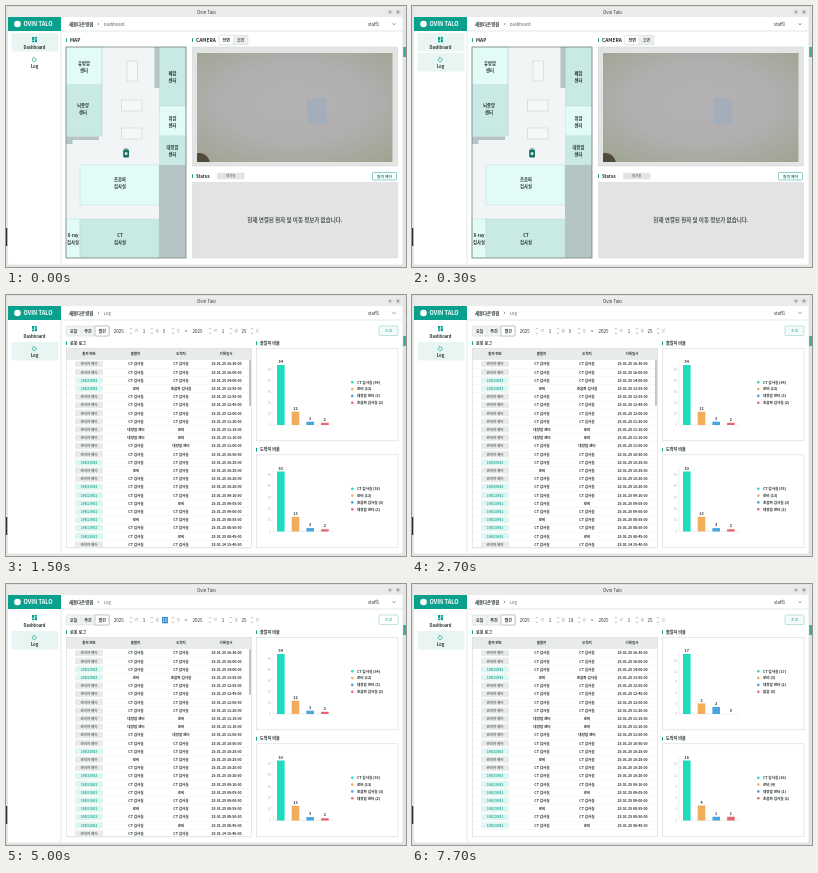
An HTML page with a canvas that plays this animation: 400x261 px, repeating every 8 s.

```html
<!DOCTYPE html>
<html lang="ko">
<head>
<meta charset="utf-8">
<title>Ovin Talo</title>
<style>
html, body { margin: 0; width: 100%; height: 100%; overflow: hidden; background: #e3e6e5; }
canvas { display: block; width: 400px; height: 261px; }
</style>
</head>
<body>
<canvas id="stage"></canvas>
<script>
const W = 400, H = 261, LOOP = 8000;
const canvas = document.getElementById('stage');
const dpr = window.devicePixelRatio || 1;
canvas.width = Math.round(W * dpr);
canvas.height = Math.round(H * dpr);
const g = canvas.getContext('2d');
const FONT = '"Noto Sans CJK KR", "Noto Sans", sans-serif';
const TEAL = '#09a18d', INK = '#26302f', PALE = '#e2fbf7', MID = '#c9e9e4', GREY = '#b5c5c5', LINE = '#d3d9d9';
const BARS = ['#1fdbbd', '#f2ad5b', '#4ba5dd', '#e66570'];

function box(x, y, w, h, fill, stroke, lw = 0.6) {
  if (fill) { g.fillStyle = fill; g.fillRect(x, y, w, h); }
  if (stroke) { g.strokeStyle = stroke; g.lineWidth = lw; g.strokeRect(x, y, w, h); }
}
function round(x, y, w, h, r, fill, stroke, lw = 0.6) {
  g.beginPath();
  g.roundRect(x, y, w, h, r);
  if (fill) { g.fillStyle = fill; g.fill(); }
  if (stroke) { g.strokeStyle = stroke; g.lineWidth = lw; g.stroke(); }
}
function text(s, x, y, size = 3.6, color = INK, weight = 700, align = 'center') {
  g.font = `${weight} ${size}px ${FONT}`;
  g.textAlign = align;
  g.textBaseline = 'middle';
  g.fillStyle = color;
  g.fillText(s, x, y);
}
function path(points, color, lw = 0.6) {
  g.beginPath();
  points.forEach(([x, y], i) => i ? g.lineTo(x, y) : g.moveTo(x, y));
  g.strokeStyle = color;
  g.lineWidth = lw;
  g.stroke();
}
function dot(x, y, r, color) {
  g.beginPath();
  g.arc(x, y, r, 0, 7);
  g.fillStyle = color;
  g.fill();
}
function heading(s, x, y, size = 4.3) {
  box(x, y - 1.7, 1, 3.6, TEAL);
  text(s, x + 4, y, size, INK, 700, 'left');
}

function drawWindow(page) {
  box(0, 0, W, H, '#e3e6e5');
  box(0, 222, 2, 18, '#2b302f');
  box(397, 41, 3, 10, '#45a79b');
  round(1.5, 1, 395.5, 258, 2, '#fff', '#cfd4d4', 0.5);
  box(2, 1.3, 394.7, 9.7, '#ebebea');
  text('Ovin Talo', 200.5, 6, 4.4, '#333', 500);
  dot(384, 6, 2.8, '#e0e0e0');
  dot(392, 6, 2.8, '#d8d8d8');
  box(383.2, 5.2, 1.7, 1.7, null, '#777', 0.4);
  path([[391, 5], [393, 7]], '#555', 0.5);
  path([[393, 5], [391, 7]], '#555', 0.5);

  box(2, 11, 53, 14, TEAL);
  dot(11.5, 18, 3.3, '#fff');
  text('OVIN TALO', 17.5, 18.2, 5.6, '#fff', 700, 'left');
  box(55, 24.7, 342, 0.6, LINE);
  box(54.7, 25, 0.6, 233.5, LINE);
  text('새봄다온병원', 63, 18, 4.4, INK, 700, 'left');
  path([[91.8, 16.8], [93, 18], [91.8, 19.2]], '#666');
  text(page, 97.8, 18, 4.1, '#555f5e', 400, 'left');
  text('staff1', 362, 18, 4.4, INK, 400, 'left');
  path([[386.6, 17.4], [388, 18.8], [389.4, 17.4]], '#555', 0.7);
}

function drawSidebar(dash, log) {
  if (dash) round(5.5, 27, 47, 18.5, 1, '#e8f5f2');
  if (log) round(5.5, 47, 47, 18.5, 1, '#e8f5f2');
  box(26, 31, 2.2, 2.9, TEAL);
  box(28.8, 31, 2.2, 1.7, TEAL);
  box(26, 34.5, 2.2, 1.7, TEAL);
  box(28.8, 33.3, 2.2, 2.9, TEAL);
  text('Dashboard', 28.5, 41, 4.1);
  g.beginPath();
  g.arc(28.2, 53.7, 1.9, -1.2, 3.8);
  g.strokeStyle = TEAL;
  g.lineWidth = 0.7;
  g.stroke();
  path([[27, 50.9], [28.4, 51.8], [27, 52.6]], TEAL);
  text('Log', 28.5, 60.3, 4.3);
}

function room(x, y, w, h, fill, lines, cx, cy) {
  box(x, y, w, h, fill, '#b5d4cf', 0.4);
  lines.forEach((s, i) => text(s, cx, cy + i * 7, 4.3));
}
function drawMap() {
  heading('MAP', 60, 34, 4.8);
  box(60, 41, 120, 211, '#f1f5f5');
  room(60, 41, 36, 38, PALE, ['유방암', '센터'], 78, 57);
  room(60, 79, 36, 51, MID, ['뇌종양', '센터'], 77, 99.5);
  room(153.5, 41, 26.5, 59, MID, ['폐암', '센터'], 166.5, 67);
  room(153.5, 100, 26.5, 30, PALE, ['위암', '센터'], 166.5, 112);
  room(153.5, 130, 26.5, 29, MID, ['대장암', '센터'], 166.5, 141);
  room(74, 159, 79, 40, PALE, ['초음파', '검사실'], 114, 173);
  room(60, 213, 14, 39, PALE, ['X-ray', '검사실'], 67, 229.5);
  room(74, 213, 79, 39, MID, ['CT', '검사실'], 114, 229.5);
  box(153, 159, 27, 93, GREY);
  box(148.5, 41, 5, 41, GREY);
  box(60, 130.5, 33, 3.5, GREY);
  box(60, 131, 6.5, 7, GREY);
  for (const [x, y, w, h] of [[121, 55, 10.5, 20], [115.5, 94, 20.5, 11], [115.5, 122, 20.5, 11]]) {
    box(x, y, w, h, '#f6f8f8', '#c3cbcb', 0.5);
  }
  path([[96, 41], [96, 128]], '#c6cccc', 0.4);
  box(118.5, 142.2, 3, 1.2, '#8d9a99');
  round(117.2, 143.5, 5.8, 8, 1, '#1b6f66');
  box(118.8, 146.3, 2.6, 2.6, '#dcecea');
  box(60, 41, 120, 211, null, '#6c7776', 0.7);
}

function drawCamera() {
  heading('CAMERA', 186, 34, 4.9);
  round(213, 29.3, 29, 9.5, 1, '#eceeee', LINE, 0.5);
  round(213, 29.3, 14.3, 9.5, 1, '#fff', LINE, 0.5);
  text('전면', 220.2, 34, 4);
  text('후면', 234.6, 34, 4, '#55605f');
  box(186.5, 41, 205, 119, '#e3e5e5', '#ccd1d1', 0.5);
  g.save();
  g.beginPath();
  g.rect(191, 47, 195.5, 109);
  g.clip();
  g.save();
  g.translate(289, 97);
  g.scale(1.9, 1);
  const shade = g.createRadialGradient(0, 0, 0, 0, 0, 75);
  shade.addColorStop(0, '#b5b2b5');
  shade.addColorStop(0.55, '#b0aeae');
  shade.addColorStop(1, '#a0a592');
  box(-60, -60, 120, 120, shade);
  g.restore();
  dot(193, 158, 11, '#514b3c');
  g.translate(311, 105);
  g.rotate(-0.035);
  box(-9.5, -13, 19, 26, '#a4aeba');
  g.restore();
}

function drawStatus() {
  heading('Status', 186, 170, 4.4);
  round(211, 166.8, 27.5, 6.4, 1, '#e2e4e4');
  text('대기중', 224.7, 170, 3.4, '#747d7c');
  round(366.5, 166.5, 24, 7.5, 1, '#fff', '#58b9ac', 0.7);
  text('원격 제어', 378.5, 170.2, 3.8, '#1c8476');
  box(186.5, 176.5, 205, 75.5, '#e3e3e3', '#d2d5d5', 0.5);
  text('현재 연결된 환자 및 이동 정보가 없습니다.', 289, 214.3, 5.5, '#4a5352');
}

function arrows(x) {
  path([[x - 1.1, 34.3], [x, 33.2], [x + 1.1, 34.3]], '#777', 0.5);
  path([[x - 1.1, 37.7], [x, 38.8], [x + 1.1, 37.7]], '#777', 0.5);
}
function drawFilter(day, selected, hover) {
  round(60.3, 31, 43, 10, 1, '#f1f3f3', LINE);
  round(89, 31, 14, 10, 1, '#fff', '#8b9493', 0.5);
  box(74.8, 31, 0.5, 10, LINE);
  ['오늘', '주간', '월간'].forEach((s, i) => text(s, 67.8 + i * 14.2, 36, 4.1));
  const dates = [[107.8, '2025', 125, '년'], [136.8, '1', 146, '월'], [156.4, day, 167, '일'],
    [186.5, '2025', 204, '년'], [215.7, '1', 225, '월'], [235.5, '25', 246, '일']];
  dates.forEach(([x, value, ax, unit], i) => {
    const marked = selected && i === 2;
    if (marked) box(156, 33, value > 9 ? 6 : 4, 6.3, '#348fd5');
    text(value, x, 36, 4.5, marked ? '#fff' : INK, 500, 'left');
    arrows(ax);
    text(unit, ax + 5.3, 36, 3.7, '#929a99', 400);
  });
  text('~', 180, 36, 5);
  round(373, 31, 19, 9.5, 1, hover ? '#f3fbfa' : '#fff', '#92d5cc');
  text('조회', 382.7, 35.8, 3.9, '#35ae9f', 500);
}

// C: CT room, L: lobby, D: colorectal centre, U: ultrasound room
const PLACE = { C: 'CT 검사실', L: '로비', D: '대장암 센터', U: '초음파 검사실' };
const FROM = 'CCCLCCCCDDCCCLCCCCCLCCC';
const TO = 'CCCUCCCCLLDCCCCCCLCCCLC';
const WHO = 'AABBAAAAAAAABAABCCCCCCA';
const ID = { A: '관리자 제어', B: '19831983', C: '19811981' };
const TIMES = ('16:30 16:00 14:00 13:55 12:55 12:45 12:00 11:20 11:15 11:10 11:00 10:50 ' +
  '10:25 10:25 10:20 10:20 09:10 09:05 09:00 08:55 08:50 08:45 15:40').split(' ');

function drawTable(rows, scroll) {
  heading('로봇 로그', 60, 48, 4.1);
  box(60.3, 53.3, 185, 199, '#fff', LINE);
  box(60.3, 53.3, 185, 11, '#e9ebeb', LINE, 0.4);
  [['환자 번호', 83], ['출발지', 129.5], ['도착지', 175], ['기록일시', 220]]
    .forEach(([s, x]) => text(s, x, 58.8, 3.5));
  for (let i = 0; i < rows; i++) {
    const y = 69 + i * 8.2, staff = WHO[i] === 'A';
    box(60.5, y + 4, 184, 0.3, '#e4e8e8');
    round(69, y - 3, 28, 6, 1, staff ? '#e9ebeb' : '#def6f2');
    text(ID[WHO[i]], 83, y, 3.5, staff ? '#6a7372' : '#2bab9a');
    text(PLACE[FROM[i]], 130, y);
    text(PLACE[TO[i]], 175, y);
    text(`25.01.${i > 21 ? 14 : 25} ${TIMES[i]}:00`, 220.5, y, 3.5);
  }
  if (scroll) round(243.2, 65, 1.6, 46, 0.8, '#b0b6b6');
}

function drawChart(title, top, values, names, step) {
  const base = top + 76.7, unit = 60 / Math.max(...values);
  heading(title, 250, top - 5.2, 4.1);
  box(250.3, top, 141.7, 92.5, '#fff', LINE);
  path([[267, base - 63], [267, base], [327, base]], '#dce0e0', 0.5);
  for (let v = 0; v * unit <= 63; v += step) {
    text(v, 265, base - v * unit, 2.9, '#aab1b0', 400, 'right');
  }
  values.forEach((v, i) => {
    const x = 271 + i * 14.7, h = v * unit;
    box(x, base - h, 7.6, h, BARS[i]);
    text(v, x + 3.8, base - h - 3.2, 3.7);
    const y = top + 34 + i * 6.8;
    dot(346.3, y, 1.3, BARS[i]);
    text(`${names[i]} (${v})`, 351, y, 3.6, INK, 700, 'left');
  });
}

const { C, L, D, U } = PLACE;
const FIRST = [C, L, '뇌종양 센터', '유방암 센터'];
const DATA = [
  { rows: 0, step: 3, from: [[21, 5, 1, 1], FIRST], to: [[21, 5, 1, 1], FIRST] },
  { rows: 23, step: 10, from: [[54, 12, 3, 2], [C, L, D, U]], to: [[53, 13, 3, 2], [C, L, U, D]] },
  { rows: 22, step: 3, from: [[17, 3, 2, 0], [C, L, D, '없음']], to: [[16, 4, 1, 1], [C, L, D, U]] }
];

// Each entry is the time at which the spinner moves to the value.
const SPIN = [[0, 3], [4200, 4], [4400, 5], [4500, 6], [4600, 7]];
for (let v = 8; v <= 18; v++) SPIN.push([4800 + (v - 8) * 100, v]);
for (let v = 19; v <= 22; v++) SPIN.push([6000 + (v - 19) * 100, v]);
SPIN.push([6500, 20], [6700, 18]);

function draw(t) {
  g.setTransform(dpr, 0, 0, dpr, 0, 0);
  const onLog = t >= 400;
  drawWindow(onLog ? 'Log' : 'Dashboard');
  drawSidebar(!onLog, t >= 200);
  if (!onLog) {
    drawMap();
    drawCamera();
    drawStatus();
    return;
  }
  const day = SPIN.filter(s => s[0] <= t).pop()[1];
  const hover = (t >= 1500 && t < 3500) || t >= 6900;
  const d = DATA[t < 1500 ? 0 : t < 7200 ? 1 : 2];
  drawFilter(String(day), t >= 4200 && t < 7100, hover);
  drawTable(d.rows, d.rows > 22);
  drawChart('출발지 비율', 53.3, ...d.from, d.step);
  drawChart('도착지 비율', 159.8, ...d.to, d.step);
}

const start = performance.now();
function tick() {
  draw((performance.now() - start) % LOOP);
  requestAnimationFrame(tick);
}
tick();
</script>
</body>
</html>
```
